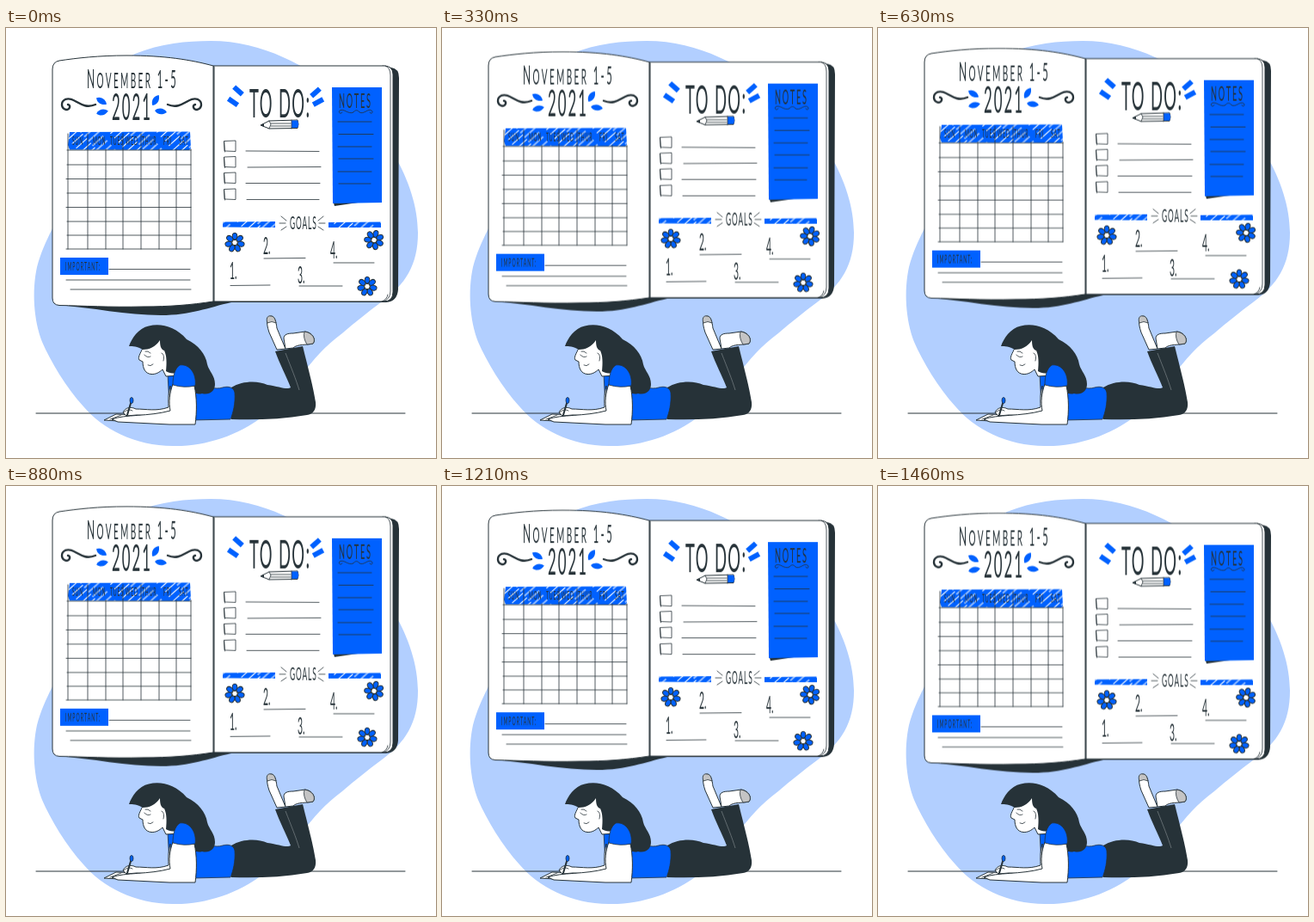
Recreate the animation shown at these times as an HTML page without scripts. Size 500x500 px, loop 1.5 s.

```html
<!DOCTYPE html>
<html lang="en">
<head>
<meta charset="utf-8">
<title>Weekly planner</title>
<style>
  html, body { margin: 0; width: 100%; height: 100%; overflow: hidden; background: #fff; }
  svg { display: block; width: 100%; height: 100%; }
  .blue { fill: #0061ff; }
  .dark { fill: #263238; }
  .page, .skin { fill: #fff; stroke: #263238; stroke-linejoin: round; }
  .ink { fill: none; stroke: #263238; stroke-linecap: round; stroke-linejoin: round; }
  .swirl { stroke-width: 2.4; }
  .thin { stroke-width: .8; }
  .toe { fill: #c4c4c4; stroke: #263238; stroke-width: .8; }
  .scribble { fill: url(#hatch); }
  /* one tall, narrow hand-lettered look for all text */
  text {
    font-family: Lato, "Liberation Sans", sans-serif;
    fill: #263238;
    transform: scaleX(.4); transform-box: fill-box; transform-origin: left;
  }
  .days text { font-size: 13px; letter-spacing: 2px; }
  .numbers text { font-size: 26px; }
  .book { animation: float 1.5s linear infinite; }
  @keyframes float { 50% { transform: translateY(-10px); } }
</style>
</head>
<body>
<svg viewBox="0 0 500 500">
  <defs>
    <pattern id="hatch" width="7" height="41" patternUnits="userSpaceOnUse" patternTransform="rotate(48)">
      <rect class="blue" width="7" height="41"/>
      <path d="M1 0V17M4.500 16V33" stroke="#fff" stroke-width="1.1"/>
    </pattern>
    <ellipse id="petal" class="blue" cy="-7.300" rx="2.900" ry="4" stroke="#263238"/>
    <g id="flower">
      <use href="#petal"/>
      <use href="#petal" transform="rotate(51.4)"/>
      <use href="#petal" transform="rotate(102.9)"/>
      <use href="#petal" transform="rotate(154.3)"/>
      <use href="#petal" transform="rotate(205.7)"/>
      <use href="#petal" transform="rotate(257.1)"/>
      <use href="#petal" transform="rotate(308.6)"/>
      <circle class="page" r="3.2"/>
    </g>
    <path id="box" class="ink thin" d="M254 131.500L267 131V143.500L254.500 143ZM253.500 132L254.500 144"/>
    <path id="tick" class="blue" d="M-6.500-3H6.500V3H-6.500Z"/>
    <path id="curl" class="ink swirl" d="M72 89C76 90 74 95 70 95C64 94 63 86 69 83C80 79 87 96 104 89"/>
    <path id="leaf" class="blue" d="M-7 0C-3-5 4-4 7 0C3 4-3 5-7 0Z"/>
    <path id="rays" class="ink thin" d="M320 219L326 224M318 227H325M320 235L326 231"/>
  </defs>

  <path fill="#b2cfff" d="M238 15C300 15 350 45 390 76C436 112 479 178 479 238C479 275 465 298 436 319C420 331 406 342 391 355C350 385 338 420 298 452C270 474 230 487 194 486C150 486 112 466 90 440C70 418 52 388 42 365C32 340 30 305 36 278C45 245 60 225 75 190C100 120 110 50 150 30C180 18 210 15 238 15Z"/>

  <g class="book">
    <path class="dark" d="M438 43.500L448 46Q457 47 457 58L456 304Q455 318 442 319H262C235 325 215 334 180 334C140 334 100 325 60 322L241 300Z"/>
    <path class="page" d="M241 44H441Q450 45 450 54V307Q450 318 439 318H241Z"/>
    <path class="ink thin" d="M441 44Q447 46 447 55V306Q447 316 438 318M444 310Q443 316 437 318"/>
    <path class="page" d="M241 44C215 37 185 32 140 32C108 32 82 35 62 38Q54 39.500 54 48V314Q54 322 62 322.500C90 323 120 325 160 324C190 324 215 322 241 318Z"/>
    <path class="ink" d="M242 45V318"/>

    <!-- left page -->
    <text x="94" y="70" font-size="30" letter-spacing="6">N<tspan font-size="25">OVEMBER</tspan><tspan font-size="28"> 1-5</tspan></text>
    <text x="123" y="107" font-size="42" letter-spacing="5">2021</text>
    <use href="#curl"/>
    <use href="#curl" transform="matrix(-1 0 0 1 292 0)"/>
    <use href="#leaf" transform="translate(111 85) rotate(32)"/>
    <use href="#leaf" transform="translate(112 98) rotate(-12)"/>
    <use href="#leaf" transform="translate(174 84) rotate(-58)"/>
    <use href="#leaf" transform="translate(180 97) rotate(8)"/>

    <path class="scribble" d="M74 121L214 120.500L215 140L213 142L74 141.500L72 136Z"/>
    <g class="days">
      <text x="77" y="136">SUN</text>
      <text x="101" y="136">MON</text>
      <text x="121" y="136">TUES</text>
      <text x="139" y="136">WED</text>
      <text x="158" y="136">THUR</text>
      <text x="183" y="136">FRI</text>
      <text x="201" y="136">SAT</text>
    </g>
    <path class="ink thin" d="M72 123V257M95 123V257M116 141V257M136 123V257M157 123V257M178 141V257M198 141V257M215 141V257M71 142H215M71 159H215M70 175.500H215M71 192H215M70 208.500H215M71 225H215M71 241H215M70 257H215"/>

    <path class="blue" d="M63 267H119V287H63Z"/>
    <text x="69" y="282" font-size="13" letter-spacing="2.600">IMPORTANT:</text>
    <path class="ink thin" d="M120 280.500H214M70 293H214M75 304H215"/>

    <!-- right page -->
    <use href="#tick" transform="translate(270 73) rotate(42)"/>
    <use href="#tick" transform="translate(264 86) rotate(34)"/>
    <use href="#tick" transform="translate(360 75) rotate(-42)"/>
    <use href="#tick" transform="translate(363 86) rotate(-28)"/>
    <text x="283" y="104" font-size="46" letter-spacing="3.500">TO DO:</text>
    <g>
      <path class="page" d="M296 113L306 108L339 107Q341 112 339 116.500L306 117Z"/>
      <path class="blue" d="M332 107.500H339Q341 112 339 116H332Z"/>
      <path class="ink thin" d="M306 108L308 112L306 117M308 111H331M308 114H331M332 107V117"/>
      <path class="dark" d="M296 113L300 111V115Z"/>
    </g>

    <use href="#box"/>
    <use href="#box" y="18.500"/>
    <use href="#box" y="37"/>
    <use href="#box" y="56"/>
    <path class="ink thin" d="M279 143L364 143.500M281 162L366 161.500M279 180.500H365M280 199.500H364"/>

    <path class="dark" d="M380 200L382 207L416 202Z"/>
    <path class="blue" d="M379 69H437V203L380 204Z"/>
    <text x="387" y="93" font-size="23" letter-spacing="4.500">NOTES</text>
    <path class="ink thin" d="M391 98C389 101 386 98 388 96C393 93 398 101 404 98C406 95 409 95 411 98C416 101 421 93 425 96C428 98 424 101 423 98"/>
    <path class="ink thin" d="M386 109H425M387 123.500H427M386 138H425M387 152H427M386 167H425M387 181H424"/>

    <path class="scribble" d="M252 225.500L313 225V232L252 231.500ZM375 226L436 225.500V232H375Z"/>
    <use href="#rays"/>
    <use href="#rays" transform="matrix(-1 0 0 1 689 0)"/>
    <text x="330" y="234" font-size="21" letter-spacing="2.200">GOALS</text>

    <g class="numbers">
      <text x="260" y="292">1.</text>
      <text x="299" y="263">2.</text>
      <text x="339" y="297">3.</text>
      <text x="377" y="268">4.</text>
    </g>
    <path class="ink thin" d="M261 299.500L307 299M300 268L348 267.500M341 300H391M381 273H428"/>
    <use href="#flower" transform="translate(266 249.500)"/>
    <use href="#flower" transform="translate(428 246.500) rotate(15)"/>
    <use href="#flower" transform="translate(420 300.500)"/>
  </g>

  <path class="ink" d="M35 448H464"/>

  <g class="woman">
    <!-- feet and legs -->
    <path class="skin" d="M315 374L306 354C302 342 303 335 308 335C313 335 314 342 315 349L325 373Z"/>
    <path class="toe" d="M304 343C302 338 304 334 308 335C312 335 313 339 314 343Q309 340 304 343Z"/>
    <path class="skin" d="M325 373L323 361C323 356 328 355 334 355L348 353C356 354 361 362 357 367C350 369 339 367 334 372Z"/>
    <path class="toe" d="M347 353C356 354 361 362 357 367L350 368Q345 360 347 353Z"/>
    <path class="dark" d="M262 418C275 410 293 410 304 415C318 417 327 421 331 418C326 405 318 390 313 376L345 370C350 390 358 420 360 435C361 444 357 449 350 450C320 455 290 456 262 455Z"/>
    <path fill="none" stroke="#8a9296" stroke-width=".6" d="M325 378C332 396 337 408 341 421"/>

    <!-- body and head -->
    <path class="blue" d="M188 402C205 400 235 424 252 418C259 416 265 418 266 424C267 436 264 448 261 455L216 456L190 440Z" stroke="#263238" stroke-width=".8"/>
    <path class="skin" d="M159 372C156 379 153 383 155 386L159 388C159 396 162 402 169 402.500C174 403 179 400 182 397L186 405L203 404L195 362L170 360Z"/>
    <path class="dark" d="M159 374C153 370 147 370 143 370C146 361 154 349 166 346.500C180 343 197 347 210 362C224 369 232 379 234 391C236 399 243 404 243 414C243 423 236 427 228 425C221 427 215 423 217 415L204 400C196 402 190 402 186 399C187 390 187 381 184 375C180 374 179 369 179 363C174 371 166 374 159 374Z"/>
    <path class="ink thin" d="M161 380Q164 384 168 382M162 376Q165 375 168 378M165 392Q168 394 171 391M181 378Q185 380 183 387"/>

    <!-- paper, arms and pen -->
    <path class="skin" d="M114 456L128 449L158 450L148 458Z"/>
    <path class="skin" d="M191 416C188 428 189 436 189 441C175 446 163 443 151 443C145 440 139 441 136 447L140 451L152 450L192 452Z"/>
    <path class="skin" d="M194 414L219 416C222 430 222 446 220 461L190 461C170 460 150 459 130 458L123 455C138 449 166 452 191 445C189 435 190 425 194 414Z"/>
    <path class="blue" d="M202 392C213 390 222 402 220 416Q207 419 194 415C194 405 196 396 202 392Z" stroke="#263238" stroke-width=".8"/>
    <path class="ink" d="M146 433L141 450" stroke-width="2"/>
    <ellipse class="blue" cx="146" cy="433" rx="2" ry="3.500" stroke="#263238" stroke-width=".8"/>
    <path class="ink thin" d="M137 447Q142 442 147 445M121 455L134 450"/>
  </g>
</svg>
</body>
</html>
```
